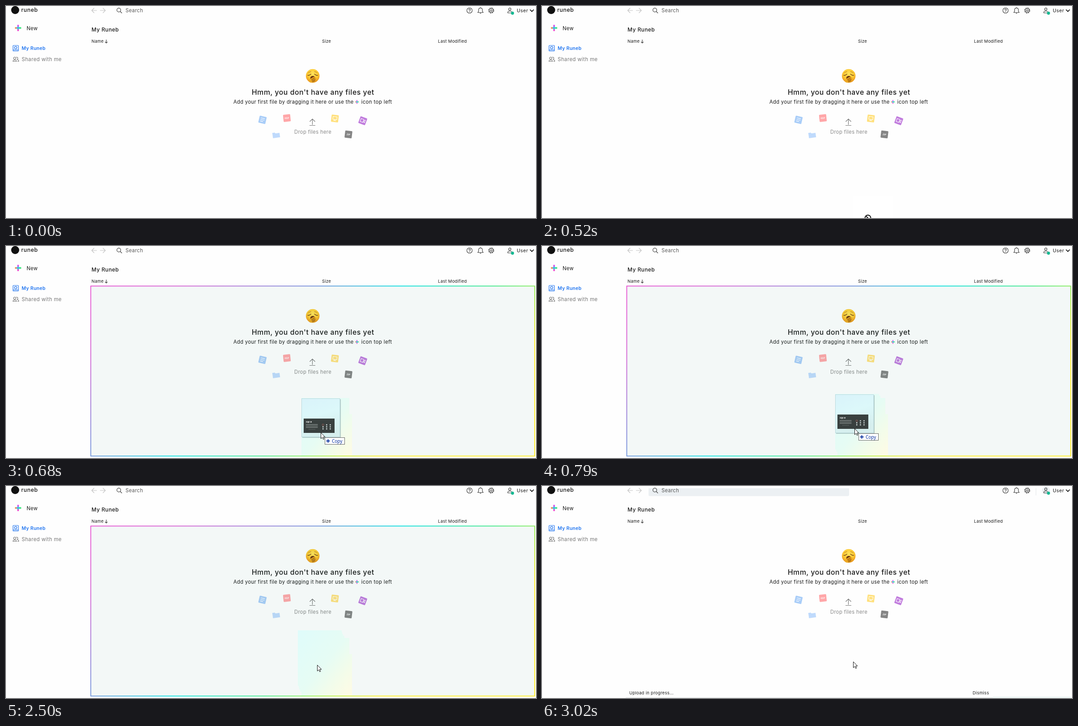
Recreate the animation shown at these times as an HTML page. Size 1184 px wide and 473 px high, loop 3.06 s.

```html
<!DOCTYPE html>
<html lang="en">
<head>
<meta charset="utf-8">
<title>File drop</title>
<style>
  html, body { margin: 0; width: 100%; height: 100%; overflow: hidden; background: #fefefe; }
  svg { display: block; }
  text { font: 11.15px Inter, sans-serif; letter-spacing: .035em; fill: #1a1a1a; }
  .small { font-size: 9.4px; }
  .mid { font-weight: 500; }
  .tag { font: bold 5px Inter, sans-serif; letter-spacing: 0; fill: #fff; text-anchor: middle; }
  .line { fill: none; stroke: #444; stroke-width: 1.2; }
  .white { fill: none; stroke: #fff; stroke-width: 1.1; }
</style>
</head>
<body>
<svg width="1184" height="473" viewBox="0 0 1184 473">
  <defs>
    <linearGradient id="rim" x2="1.197" y2=".621">
      <stop stop-color="#ea4fd2"/><stop offset=".14" stop-color="#d55fd4"/>
      <stop offset=".34" stop-color="#6e92dc"/><stop offset=".46" stop-color="#00dfe0"/>
      <stop offset=".6" stop-color="#3ce983"/><stop offset=".67" stop-color="#98ee4c"/>
      <stop offset=".77" stop-color="#ffec1c"/>
    </linearGradient>
    <linearGradient id="glow" x2="1" y2="1">
      <stop stop-color="#dffcfb"/><stop offset=".5" stop-color="#e6fcf4"/>
      <stop offset=".75" stop-color="#f3fcea"/><stop offset="1" stop-color="#fffbe4"/>
    </linearGradient>
    <linearGradient id="card" x2=".3" y2="1">
      <stop stop-color="#d9f3fa"/><stop offset=".5" stop-color="#dcf8fa"/><stop offset="1" stop-color="#d6efee"/>
    </linearGradient>
    <linearGradient id="across">
      <stop offset=".1" stop-color="#ff8a5c"/><stop offset=".5" stop-color="#16d6ea"/><stop offset=".9" stop-color="#4be87c"/>
    </linearGradient>
    <linearGradient id="down" x2="0" y2="1">
      <stop offset=".15" stop-color="#e050f0"/><stop offset=".5" stop-color="#16d6ea"/><stop offset=".85" stop-color="#f04fd0"/>
    </linearGradient>
    <radialGradient id="face" cy=".35" r=".65">
      <stop stop-color="#ffe45c"/><stop offset=".6" stop-color="#fcc932"/><stop offset="1" stop-color="#e8901c"/>
    </radialGradient>
    <g id="plus">
      <rect x="-7" y="-1.8" width="14" height="3.6" fill="url(#across)"/>
      <rect x="-1.8" y="-7" width="3.6" height="14" fill="url(#down)"/>
    </g>
    <rect id="tile" x="-8" y="-8" width="16" height="16" rx="1.5"/>
    <path id="arrow" d="M0 0V13.4L3.2 10.5L5.3 15L7.3 14.1L5.3 9.6H9.3Z" fill="#fff" stroke="#111"/>
  </defs>

  <!-- header -->
  <circle cx="20.5" cy="9" r="9" fill="#111"/>
  <text class="mid" x="34" y="13" style="font-size:12.5px">runeb</text>
  <path class="line" style="stroke:#c2c2c2" d="M203 10H191.5M197 4.5L191.5 10L197 15.5M210 10H222M216.5 4.5L222 10L216.5 15.5"/>
  <g id="hover">
    <path d="M238 5H686V19.5Q686 22.5 683 22.5H241Q238 22.5 238 19.5Z" fill="#ecf0f3"/>
    <path d="M1103.5 5V21" stroke="#e2e5e8"/>
    <circle cx="1126" cy="10" r="9" fill="#ecf0f3"/>
  </g>
  <g class="line">
    <circle cx="252" cy="9" r="4.3"/><path d="M255 12L259 16"/>
    <circle cx="1035.5" cy="10" r="6"/>
    <path d="M1033.5 8.6Q1033.5 6.6 1035.5 6.6T1037.5 8.5Q1037.5 9.6 1035.5 10.5V11.6M1035.5 12.8V13.9"/>
    <path d="M1054 14.5H1066L1064.3 12V8.5Q1064 4.3 1060 4.3T1055.7 8.5V12ZM1060 2.8V4.3M1058.5 16.3H1061.5"/>
    <circle cx="1084" cy="10" r="4.8"/><circle cx="1084" cy="10" r="2"/>
    <circle cx="1084" cy="10" r="5.7" stroke-dasharray="2.24" style="stroke-width:1.6"/>
    <circle cx="1125.5" cy="7" r="2.6"/>
    <path d="M1121 15.5V14.5Q1121 11.5 1124 11.5H1127Q1130 11.5 1130 14.5V15.5Z"/>
    <path d="M1170.5 8L1174.8 12.2L1179 8" style="stroke:#111;stroke-width:1.7"/>
  </g>
  <circle cx="1131.5" cy="16" r="3.4" fill="#14b892"/>
  <text x="267" y="14" style="fill:#555">Search</text>
  <text x="1141" y="14" style="font-size:10.7px">User</text>

  <!-- sidebar -->
  <use href="#plus" x="27" y="49"/>
  <text x="46" y="53.5">New</text>
  <g class="line" style="stroke:#1f74f0">
    <rect x="15.7" y="88" width="12" height="12.5" rx="1"/><circle cx="21.7" cy="93" r="2.7"/><path d="M16 98H27.5"/>
  </g>
  <text x="35" y="98.3" style="font-weight:600;font-size:10.4px;fill:#1f74f0">My Runeb</text>
  <g class="line" style="stroke:#777">
    <circle cx="19.5" cy="116.5" r="2.5"/><path d="M15.5 123.5Q15.5 120.5 19.5 120.5T23.5 123.5Z"/>
    <path d="M23 114.2Q26.5 114 26.5 116.7T24 119Q28.5 120 28.5 123.5H25.5"/>
  </g>
  <text x="35" y="123" style="font-size:11.4px;fill:#777">Shared with me</text>

  <!-- file list -->
  <text class="mid" x="191" y="56.5" style="font-size:12px">My Runeb</text>
  <text class="small" x="191" y="82">Name</text>
  <path class="line" d="M224 75V82.5M221.3 80L224 82.7L226.7 80"/>
  <text class="small" x="706" y="82">Size</text>
  <text class="small" x="965" y="82">Last Modified</text>

  <g transform="translate(685.2 156)">
    <circle r="15.2" fill="url(#face)"/>
    <g fill="none" stroke="#71401a" stroke-width="1.4" stroke-linecap="round">
      <path d="M-11 -1.5Q-8 -.5 -4 -4M4 -4Q8 -.5 11 -1.5"/>
      <path d="M-10 -7Q-7.5 -9.5 -4 -9.5M4 -9.5Q7.5 -9.5 10 -7" stroke="#b8741c" stroke-width="1"/>
    </g>
    <ellipse cy="5" rx="5.5" ry="5" fill="#6b3512"/>
    <path d="M-8.5 13Q-8 7 -2 4.5Q5 .5 6 3Q9 4 8 8Q9 10 6 12Q4 15 -1 15Q-6 15.5 -8.5 13Z" fill="#eda822"/>
    <path d="M-3 8.5L4.500 4.500M-2 11L6 7.500M-1 13.500L5.500 10.500" fill="none" stroke="#7b430f" stroke-width="1.2"/>
  </g>
  <text class="mid" x="549" y="197.5" style="font-size:15.8px">Hmm, you don't have any files yet</text>
  <text x="508" y="218">Add your first file by dragging it here or use the</text>
  <use href="#plus" transform="translate(784 214) scale(.6)"/>
  <text x="793.5" y="218" style="font-size:11.4px">icon top left</text>

  <g transform="translate(573 254) rotate(13)">
    <use href="#tile" fill="#a9cdf8"/><path class="white" d="M-4.5 -3.5H4.5M-4.5 0H4.5M-4.5 3.5H2"/>
  </g>
  <g transform="translate(627.5 250) rotate(-6)">
    <use href="#tile" fill="#ffa6a8"/><text class="tag" y="2">PDF</text>
  </g>
  <g transform="translate(734.7 251) rotate(7)">
    <use href="#tile" fill="#ffe07c"/><path class="white" d="M-4.5 -4H4.5V2H-4.5ZM0 2V4.5M-3 4.5H3"/>
  </g>
  <g transform="translate(797 256) rotate(20)">
    <use href="#tile" fill="#c07bdd"/><path class="white" d="M-5 -3.5H1.5V3.5H-5ZM1.5 -.5L5 -3V3L1.5 .5"/>
  </g>
  <path transform="translate(603.6 288) rotate(-8)" d="M-8 -6H-2.5L-1 -4H8V6H-8Z" fill="#bfdafc"/>
  <g transform="translate(765 286.5) rotate(7)">
    <use href="#tile" fill="#858585"/><text class="tag" y="2" style="font-style:italic">ZIP</text>
  </g>
  <path class="line" style="stroke:#777" d="M684.5 265V252M678.5 258L684.5 252L690.5 258M678 266.5H691"/>
  <text x="644" y="284.5" style="fill:#888">Drop files here</text>

  <!-- drop zone -->
  <g id="zone">
    <rect x="188" y="88" width="994" height="382" fill="rgb(0,110,100)" fill-opacity=".045"/>
    <path id="trail" fill="url(#glow)"/>
    <path d="M188.5 88.5H1182V469.5H188.5ZM190.3 90.3V467.7H1180.2V90.3Z" fill="url(#rim)" fill-rule="evenodd"/>
  </g>
  <path id="strip" d="M188 469.5H670V473H188ZM773 469.5H1182V473H773Z" fill="#f1f8f7"/>

  <!-- upload notice -->
  <g id="toast">
    <rect x="187" y="450" width="820" height="50" fill="#fefefe"/>
    <path d="M187 472.5H1007" stroke="#dadedf"/>
    <text class="small" x="195" y="464.5">Upload in progress...</text>
    <text class="small" x="962" y="465">Dismiss</text>
  </g>

  <!-- pointer; its hot spot is the local zero point -->
  <g id="blocked" fill="none" stroke="#111" stroke-width="2">
    <rect x="-33" y="-50" width="90" height="60" fill="#fff" stroke="none"/>
    <circle r="6.5"/><path d="M-4.6 -4.6L4.6 4.6"/>
  </g>
  <g id="drag">
    <rect x="-41" y="-75" width="86" height="86" fill="#6f8a8c" fill-opacity=".45"/>
    <rect x="-42.5" y="-76.5" width="85.5" height="85.5" fill="url(#card)" stroke="#b9d9dd"/>
    <rect x="-38" y="-32" width="69" height="32" fill="#39403f"/>
    <text class="tag" x="-33" y="-23" style="font-size:4px;text-anchor:start">Sign In</text>
    <path d="M-33 -18H-6.5M-33 -13H-6.5" stroke="#666d6c" stroke-width="3.6"/>
    <path d="M-27 -8H-12" stroke="#697170" stroke-dasharray="2 .7"/>
    <path d="M4 -18H23M4 -13.5H23M4 -9H23" stroke="#d8e2e2" stroke-width="2.4" stroke-dasharray="2.4 5.7"/>
    <circle cx="5.2" cy="-18" r="2" fill="#39403f" stroke="#a06058" stroke-width=".8"/>
    <rect x="9.5" y="10.5" width="44" height="15" fill="#fff" stroke="#666"/>
    <path d="M12.5 18H20.5M16.5 14V22" stroke="#0a32a0" stroke-width="2"/>
    <text x="25" y="21.5" style="font:10px 'Noto Sans',sans-serif;letter-spacing:0;fill:#0a32a0">Copy</text>
  </g>
  <use id="pointer" href="#arrow"/>
</svg>
<script>
  const LOOP = 3060, ENTER = 580, DROP = 2500, CLEAR = 2550, LIFT = 2580, NOTICE = 2730;
  // Pointer stops: time, x, y
  const stops = [
    [340, 734, 486], [400, 732, 482], [460, 730, 478], [520, 728, 473],
    [ENTER, 720, 470], [630, 714, 453], [680, 703, 417], [730, 700, 412],
    [790, 698, 408], [850, 697, 404], [880, 695, 400],
  ];
  const $ = id => document.getElementById(id);
  const show = (id, on) => $(id).style.display = on ? '' : 'none';
  const move = (id, x, y) => $(id).setAttribute('transform', `translate(${x} ${y})`);

  // Soft patches left behind wherever the dragged card has been
  function trailPath(passed) {
    return passed.map(([time, x, y], i) => {
      if (time <= ENTER) return '';
      const [, px, py] = passed[i - 1];
      return `M${x - 43} ${y - 78}H${px + 53}V${Math.min(469, py + 42)}H${x - 43}Z`;
    }).join('');
  }

  function draw(t) {
    const passed = stops.filter(stop => stop[0] <= t);
    const [, x, y] = passed.at(-1) || [0, 740, 500];
    const inZone = t >= ENTER && t < CLEAR;
    show('blocked', t >= 340 && t < ENTER);
    show('zone', inZone);
    show('drag', t >= ENTER && t < DROP);
    show('pointer', t >= ENTER);
    show('hover', t >= CLEAR);
    show('strip', t >= CLEAR);
    show('toast', t >= NOTICE);
    move('blocked', x, y);
    move('drag', x, y);
    move('pointer', x + .5, t < LIFT ? y - .5 : y - 8);
    if (inZone) $('trail').setAttribute('d', trailPath(passed));

    const step = Math.min(5, Math.floor((t - NOTICE) / 58));
    move('toast', 0, 20 * (1 - step / 5) ** 2);
  }

  function tick() {
    draw(performance.now() % LOOP);
    requestAnimationFrame(tick);
  }
  tick();
</script>
</body>
</html>
```
